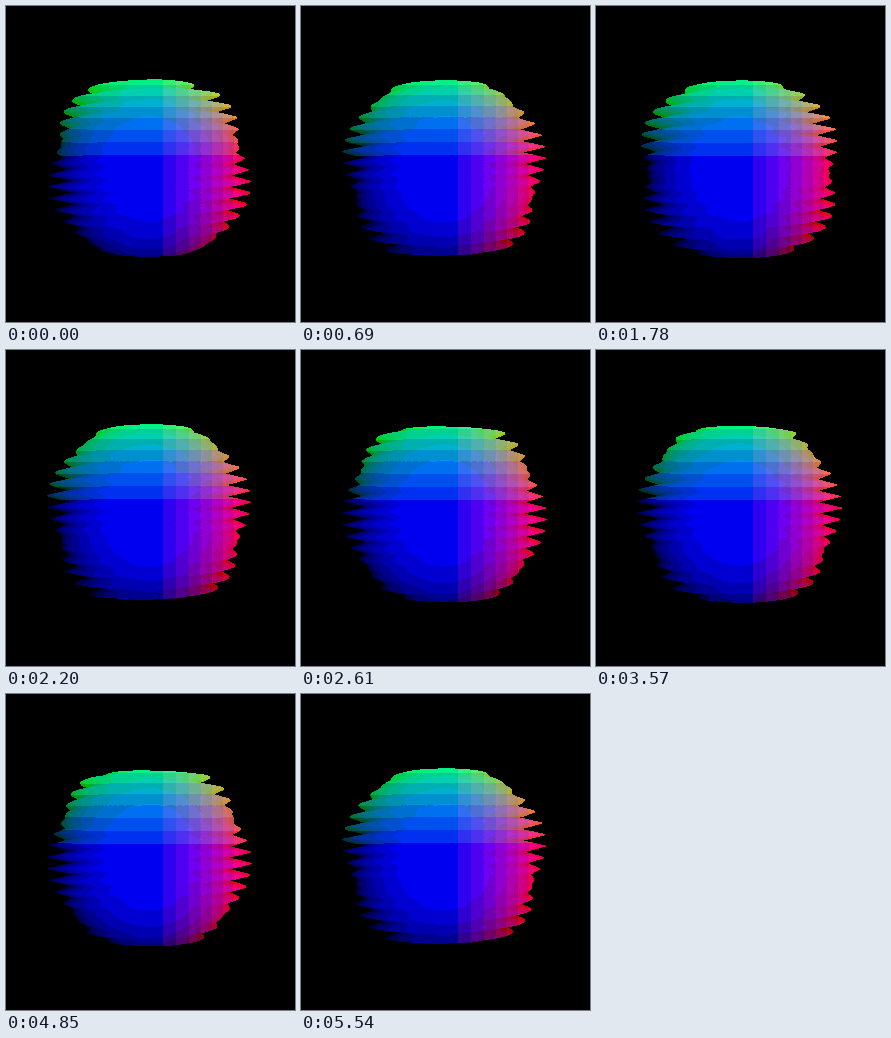
Write an HTML page with a canvas that moves like this. It is 289 px wide and 316 px high and loops after 5.64 s.

```html
<!DOCTYPE html>
<html lang="en">
<head>
<meta charset="utf-8">
<title>Ribbed sphere</title>
<style>
  html, body { margin: 0; width: 100%; height: 100%; overflow: hidden; background: #000; }
  canvas { display: block; width: 100%; height: 100%; }
</style>
</head>
<body>
<canvas id="stage" width="289" height="316"></canvas>
<script>
const W = 289, H = 316, CX = 142.7, CY = 162.5;
const LOOP = 5640, STEPS = 42, STEP_MS = 135;

const RADIUS = 89, CAP = 82, EYE = 640;
const SWELL = 12;     // depth of the ribs
const PITCH = 11.3;   // height of one turn of the thread
const TIP_Y = 146;    // height of one tip on the left side
const BAND = 97;      // distance between the calm bands

const ctx = document.getElementById('stage').getContext('2d');
const cache = [];

// Angles run from the left edge across the front to the right edge.
const angles = [];
for (let i = 0; i <= 560; i++) {
  const a = -0.25 + (Math.PI + 0.5) * i / 560;
  angles.push({ turn: a / (2 * Math.PI), x: -Math.cos(a), z: Math.sin(a) });
}

// The calm band sinks down the sphere, lagging a little in mid-loop.
function bandAt(step) {
  const part = step / STEPS;
  return 138 + 450 * part - 28 * Math.sin(Math.PI * part) ** 4;
}

// Flat colour levels, slightly narrower towards the rim.
function shade(d) {
  const n = Math.min(7, Math.floor(d / (14 - d / 42)));
  return n > 0 ? 32 * n + 16 : 0;
}

function triangle(p) {
  return 4 * Math.abs(p - Math.floor(p) - 0.5) - 1;
}

function render(step) {
  const img = ctx.createImageData(W, H);
  const px = new Uint32Array(img.data.buffer).fill(0xff000000);
  const depth = new Float32Array(W * H).fill(-1e6);
  const band = bandAt(step);
  const flip = step % 2 / 2;   // the thread makes half a turn per step

  for (let h = -CAP; h <= CAP; h += 0.2) {
    const y = CY - h;
    const base = RADIUS * (1 - (Math.abs(h) / 89) ** 2.3) ** (1 / 2.3);
    const amp = SWELL * Math.sin(Math.PI * (y - band) / BAND);
    const ball = Math.sqrt(96 * 96 - h * h);
    const phase = (y - TIP_Y) / PITCH + flip;

    for (const a of angles) {
      const r = base + amp * triangle(phase + a.turn);
      const z = r * a.z;
      const zoom = EYE / (EYE - z);
      const dx = r * a.x * zoom, dy = h * zoom;
      const sx = Math.round(CX + dx), sy = Math.round(CY - dy);
      if (sx < 0 || sx >= W || sy < 0 || sy >= H) continue;
      const i = sy * W + sx;
      if (z <= depth[i]) continue;
      depth[i] = z;
      px[i] = (0xff000000 | shade(ball * a.z) << 16 | shade(dy) << 8 | shade(dx)) >>> 0;
    }
  }
  return img;
}

let shown = -1;
function draw(now) {
  const step = Math.min(STEPS - 1, Math.floor(now % LOOP / STEP_MS));
  if (step === shown) return;
  cache[step] = cache[step] || render(step);
  ctx.putImageData(cache[step], 0, 0);
  shown = step;
}

const begin = performance.now();
function tick() {
  draw(Math.max(0, performance.now() - begin));
  requestAnimationFrame(tick);
}
tick();
</script>
</body>
</html>
```
